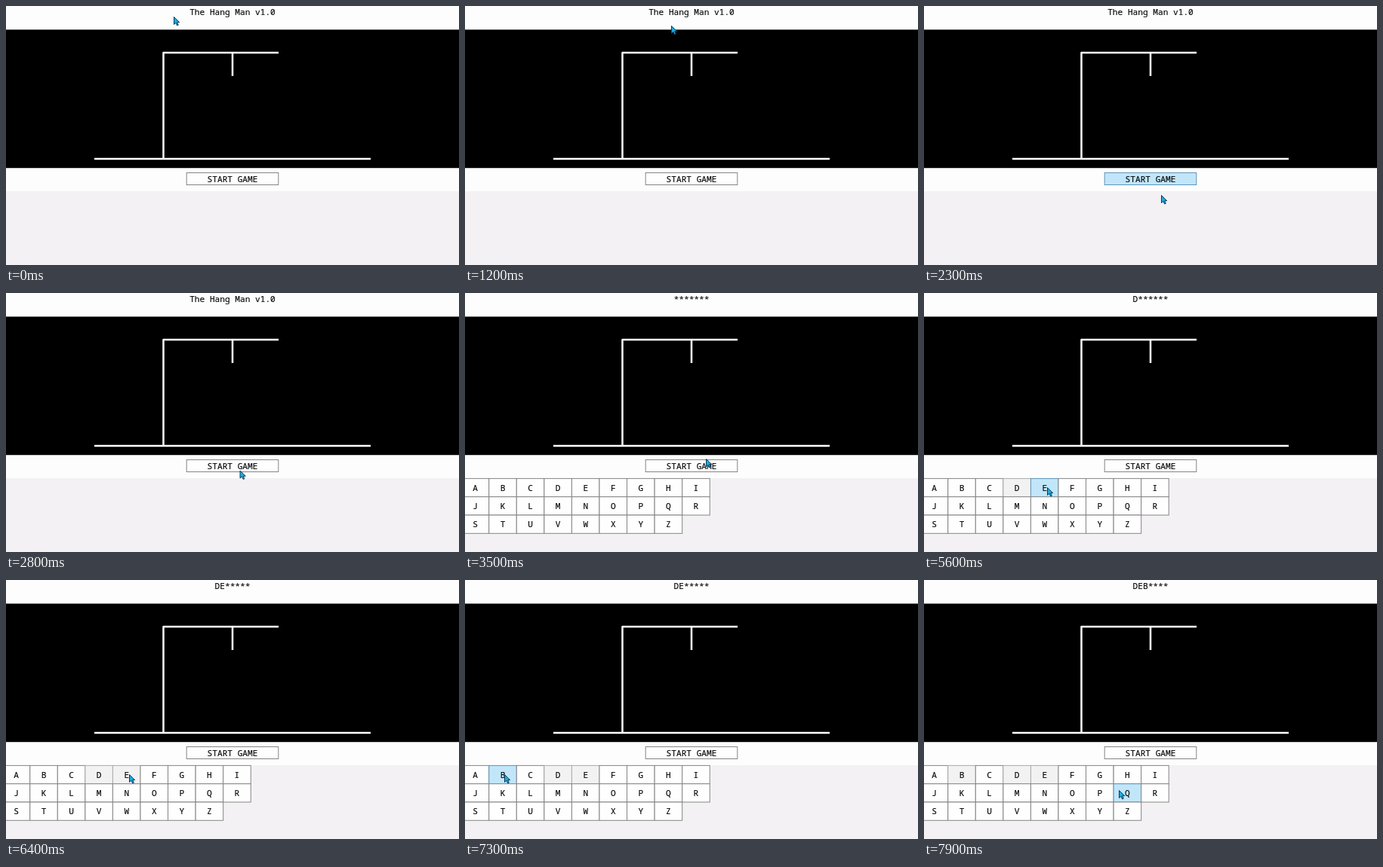
These frames come from a looping animation (600 by 344 pixels, 8000 ms). An HTML page:

```html
<!DOCTYPE html>
<html lang="en">
<head>
<meta charset="utf-8">
<title>Hang man</title>
<style>
  html, body { margin: 0; width: 100%; height: 100%; overflow: hidden; background: #f3f1f3; }
  svg { display: block; width: 600px; height: 344px; }
  text { font: 11.15px "Noto Sans Mono", "DejaVu Sans Mono", monospace; text-anchor: middle; fill: #080808; stroke: #080808; stroke-width: .15; }
  .button rect { fill: #fefefe; stroke: #858585; }
  .button.used rect { fill: #f3f2f3; stroke: #a9abad; }
  .button.hover rect { fill: #c1e6fa; stroke: #5d95b8; }
  .gallows { fill: none; stroke: #fff; stroke-width: 2.5; stroke-linejoin: round; }
  .cursor { fill: #1fa9df; stroke: #0b3c58; stroke-linejoin: round; }
</style>
</head>
<body>
<svg viewBox="0 0 600 344">
  <rect width="600" height="246" fill="#fefdfe"/>
  <rect y="31.4" width="600" height="183.8"/>
  <path class="gallows" d="M117 203H483M208.5 203V62H361M300 62V93"/>
  <text id="title" x="300" y="11.7"></text>
  <g id="panel"></g>
  <g id="keyboard"></g>
  <path id="cursor" class="cursor" d="M.5 .5V10.5L2.9 8.4L4.7 12L6.3 11.2L4.7 7.7H7.8Z"/>
</svg>
<script>
  const LOOP = 8000, STEP = 100;
  const KEY_W = 36.56, KEY_H = 24.3, LEFT = -4.8, TOP = 246.4, COLUMNS = 9;
  const KEYS_SHOWN = 3000;
  const guesses = { D: 5200, E: 6100, B: 7400 };

  // Pointer moves: start time, end time, destination
  const home = [222, 14];
  const moves = [
    [0, 500, 329, 17],
    [900, 1000, 273, 26],
    [1500, 2000, 371, 180],
    [2000, 2300, 314, 251],
    [2400, 3000, 308, 230],
    [3100, 3400, 319, 220],
    [3500, 4400, 155, 263],
    [4400, 5000, 121, 260],
    [5400, 5600, 163, 258],
    [6600, 7300, 52, 258],
    [7500, 7800, 258, 279]
  ];

  const byId = id => document.getElementById(id);
  const title = byId("title"), keyboard = byId("keyboard"), cursor = byId("cursor");

  function add(parent, tag, attributes) {
    const node = document.createElementNS("http://www.w3.org/2000/svg", tag);
    for (const name in attributes) node.setAttribute(name, attributes[name]);
    return parent.appendChild(node);
  }

  function addButton(parent, label, x, y, width, height) {
    const node = add(parent, "g", { class: "button" });
    add(node, "rect", { x, y, width, height });
    add(node, "text", { x: x + width / 2, y: y + height / 2 + 4.1 }).textContent = label;
    const contains = (px, py) => px >= x && px < x + width && py >= y && py < y + height;
    return { label, node, contains };
  }

  const start = addButton(byId("panel"), "START GAME", 239.2, 221.5, 121.6, 16);
  const keys = [..."ABCDEFGHIJKLMNOPQRSTUVWXYZ"].map((letter, i) => addButton(
    keyboard, letter,
    LEFT + (i % COLUMNS) * KEY_W, TOP + Math.floor(i / COLUMNS) * KEY_H,
    KEY_W, KEY_H
  ));

  function pointerAt(time) {
    let [x, y] = home;
    for (const [from, to, toX, toY] of moves) {
      const t = Math.min(1, Math.max(0, (time - from) / (to - from)));
      const eased = t * t * (3 - 2 * t);
      x += (toX - x) * eased;
      y += (toY - y) * eased;
    }
    return [x, y];
  }

  function titleAt(time) {
    if (time < KEYS_SHOWN) return "The Hang Man v1.0";
    const found = Object.keys(guesses).filter(letter => time >= guesses[letter]);
    return found.join("").padEnd(7, "*");
  }

  function draw(time) {
    cursor.setAttribute("transform", `translate(${pointerAt(time)})`);
    title.textContent = titleAt(time);
    keyboard.style.display = time < KEYS_SHOWN ? "none" : "";
    // Highlights trail the pointer by one step
    const touch = pointerAt(time - STEP);
    for (const button of [start, ...keys]) {
      const used = time >= guesses[button.label];
      button.node.classList.toggle("used", used);
      button.node.classList.toggle("hover", !used && button.contains(...touch));
    }
  }

  const origin = performance.now();
  function tick() {
    const time = (performance.now() - origin) % LOOP;
    draw(Math.floor(time / STEP) * STEP);
    requestAnimationFrame(tick);
  }
  tick();
</script>
</body>
</html>
```
